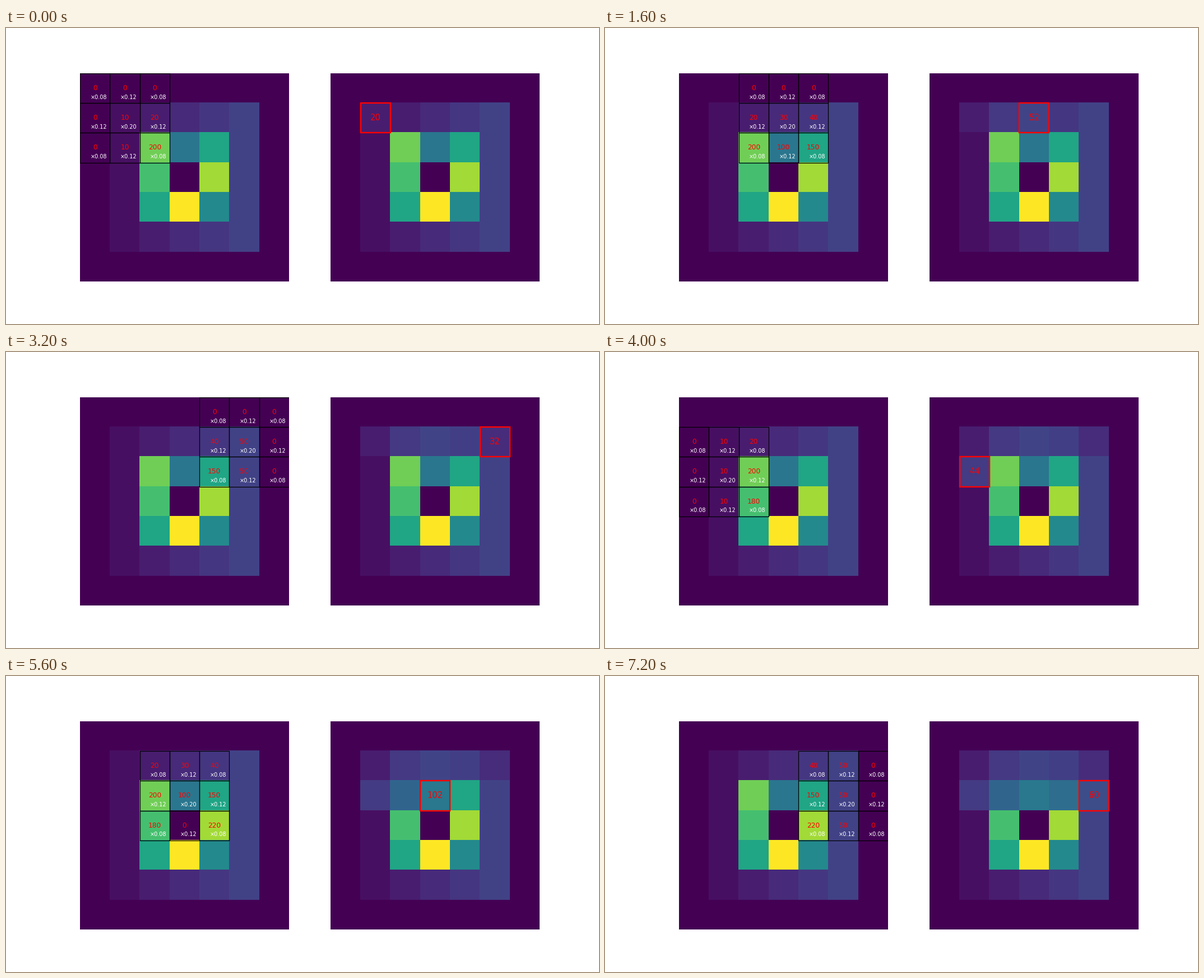
Animation of 1058x529 px, one loop 8000 ms. Source, as a matplotlib script:

```python
import numpy as np
import matplotlib.pyplot as plt
from matplotlib.animation import FuncAnimation
from matplotlib.patches import Rectangle

plt.rcParams["font.family"] = "DejaVu Sans"

SCALE = 23 / 24  # point sizes relative to a 12 x 6 inch layout
STEP_MS = 800
STEPS = 10
COLUMNS = 5

image = np.zeros((7, 7), dtype=int)
image[1:6, 1:6] = [
    [10, 20, 30, 40, 50],
    [10, 200, 100, 150, 50],
    [10, 180, 0, 220, 50],
    [10, 150, 255, 120, 50],
    [10, 20, 30, 40, 50],
]

# Normalised 3 x 3 Gaussian, sigma 1
bell = np.exp(-np.array([-1, 0, 1]) ** 2 / 2)
kernel = np.outer(bell, bell)
kernel /= kernel.sum()
OFFSETS = list(np.ndindex(3, 3))


def center_of(step):
    row, col = divmod(step, COLUMNS)
    return row + 1, col + 1


def blurred_at(row, col):
    window = image[row - 1:row + 2, col - 1:col + 2]
    return int((window * kernel).sum())


def add_cell(ax, color, width):
    cell = Rectangle((0, 0), 1, 1, fill=False, edgecolor=color,
                     linewidth=width * SCALE)
    return ax.add_patch(cell)


def add_label(ax, text, color, size, ha="center", va="center"):
    return ax.text(0, 0, text, color=color, fontsize=size * SCALE, ha=ha, va=va)


fig, (ax_in, ax_out) = plt.subplots(1, 2, figsize=(11.5, 5.75), dpi=92)
for ax in (ax_in, ax_out):
    ax.axis("off")
ax_in.imshow(image, cmap="viridis", vmin=0, vmax=255)
result_view = ax_out.imshow(image, cmap="viridis", vmin=0, vmax=255)

cells = [add_cell(ax_in, "black", 1) for _ in OFFSETS]
values = [add_label(ax_in, "", "red", 10) for _ in OFFSETS]
weights = [add_label(ax_in, f"×{kernel[o]:.2f}", "white", 8, "right", "bottom")
           for o in OFFSETS]
marker = add_cell(ax_out, "red", 2)
total = add_label(ax_out, "", "red", 12)


def update(step):
    row, col = center_of(step)
    for (dy, dx), cell, value, weight in zip(OFFSETS, cells, values, weights):
        y, x = row + dy - 1, col + dx - 1
        cell.set_xy((x - 0.5, y - 0.5))
        value.set_position((x, y))
        value.set_text(str(image[y, x]))
        weight.set_position((x + 0.4, y + 0.4))

    result = image.copy()
    for done in range(step + 1):
        result[center_of(done)] = blurred_at(*center_of(done))
    result_view.set_data(result)
    marker.set_xy((col - 0.5, row - 0.5))
    total.set_position((col, row))
    total.set_text(str(result[row, col]))
    return [result_view, *cells, *values, *weights, marker, total]


anim = FuncAnimation(fig, update, frames=STEPS, interval=STEP_MS,
                     init_func=lambda: update(0), repeat=True, repeat_delay=0)
plt.show()
```
